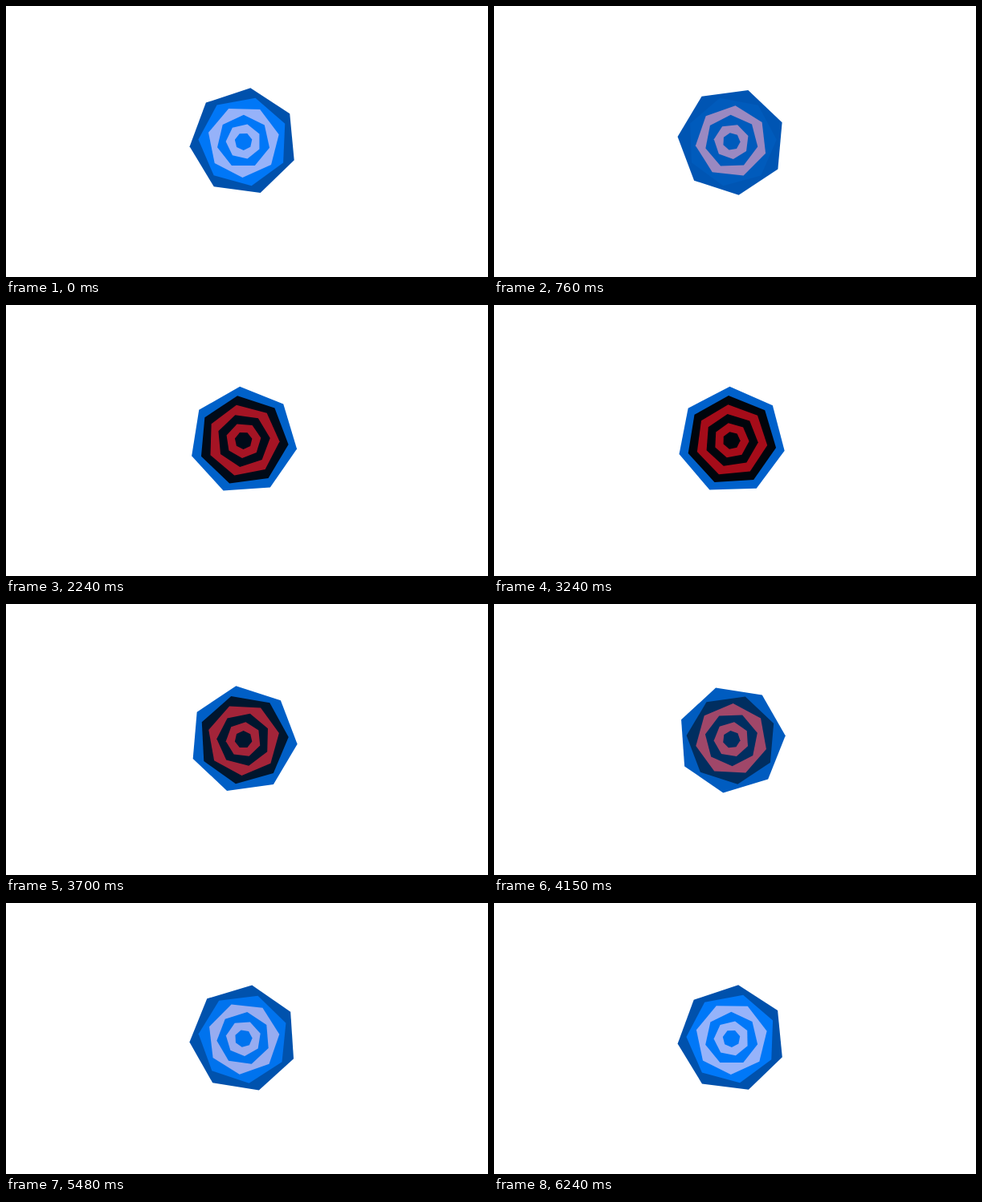
Write an HTML page that moves like this. It is 600x338 px and loops after 6270 ms.

```html
<!DOCTYPE html>
<html lang="en">
<head>
<meta charset="utf-8">
<title>Turning heptagons</title>
<style>
  html, body { margin: 0; width: 100%; height: 100%; overflow: hidden; background: #fff; }
  svg { display: block; width: 600px; height: 338px; }
</style>
</head>
<body>
<svg viewBox="0 0 600 338"><g id="rings" transform="translate(295.6 169)"></g></svg>
<script>
const LOOP = 6270;
const PEAK = 2835; // moment when all heptagons stand upright

// colour pairs: upright, fully turned
const EDGE = [[0, 98, 204], [0, 81, 171]];
const BASE = [[0, 0, 2], [0, 122, 253]];
const BAND = [[166, 5, 15], [150, 182, 254]];

// radius, full turn in degrees, colours
const LAYERS = [
  [67.3, 45, EDGE],
  [56.2, 89.5, BASE],
  [45, 130, BAND],
  [33.3, 210, BASE],
  [22, 250, BAND],
  [11, 290, BASE]
];

function heptagon(r) {
  return Array.from({ length: 7 }, (_, i) => {
    const a = i * 2 * Math.PI / 7;
    return (r * Math.sin(a)).toFixed(2) + ',' + (-r * Math.cos(a)).toFixed(2);
  }).join(' ');
}

function mix([from, to], p) {
  return 'rgb(' + from.map((v, i) => Math.round(v + (to[i] - v) * p)).join(',') + ')';
}

const group = document.getElementById('rings');
const shapes = LAYERS.map(([r]) => {
  const shape = document.createElementNS('http://www.w3.org/2000/svg', 'polygon');
  shape.setAttribute('points', heptagon(r));
  return group.appendChild(shape);
});

function draw(time) {
  const p = (1 - Math.cos(2 * Math.PI * (time - PEAK) / LOOP)) / 2;
  LAYERS.forEach(([, turn, colours], i) => {
    shapes[i].setAttribute('transform', `rotate(${(-turn * p).toFixed(3)})`);
    shapes[i].setAttribute('fill', mix(colours, p));
  });
}

const start = performance.now();
function tick() {
  draw((performance.now() - start) % LOOP);
  requestAnimationFrame(tick);
}
draw(0);
requestAnimationFrame(tick);
</script>
</body>
</html>
```
